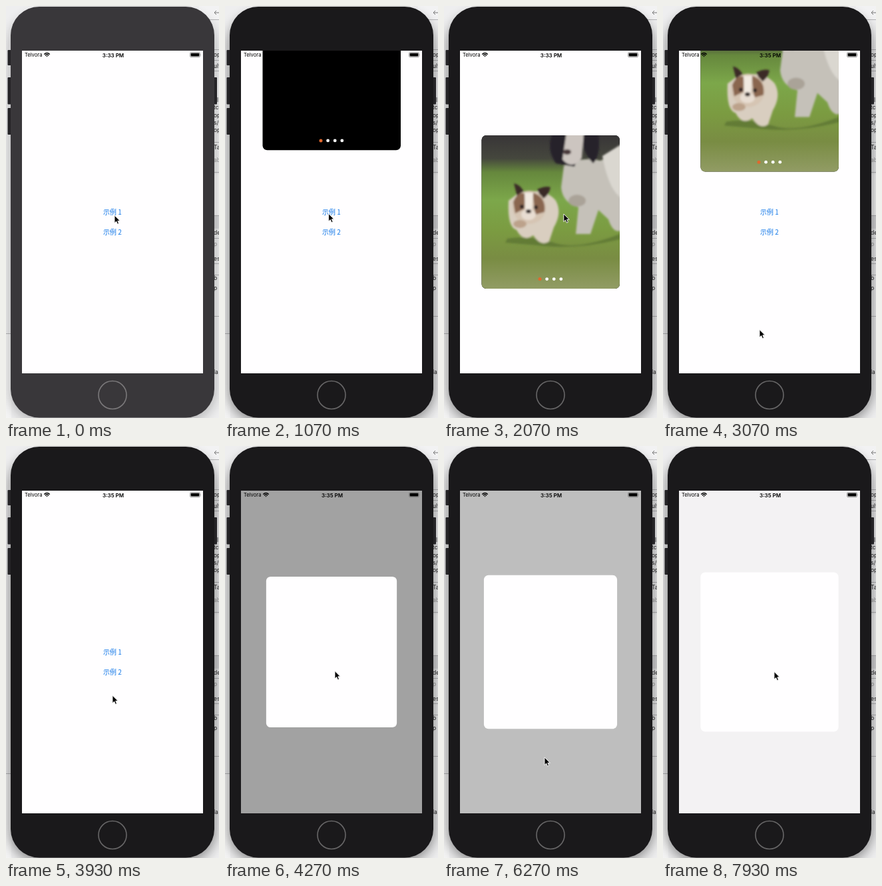
These frames come from a looping animation (320x618 px, 8 s). An HTML page:

```html
<!DOCTYPE html>
<html lang="zh">
<head>
<meta charset="utf-8">
<title>Popup demo</title>
<style>
  html, body { margin: 0; width: 100%; height: 100%; overflow: hidden; background: #e9e9ea; }
  svg { display: block; width: 320px; height: 618px; }
  .link { font: 10px "Noto Sans CJK SC", "Noto Sans CJK", sans-serif; fill: #1478e8; text-anchor: middle; }
  .bar { font: 7.6px Inter, Roboto, sans-serif; fill: #000; }
  .clock { font-weight: 600; font-size: 8px; text-anchor: middle; }
  .side { font: 8.5px Inter, sans-serif; fill: #222; }
  .faint { fill: #999; }
  #body { fill: #39373a; }
  #shade { opacity: .24; }
  .active #body { fill: #1a191b; }
  .active #shade { opacity: .42; }
  #ring { fill: none; stroke: #7b797b; stroke-width: 1.6; }
  .active #ring { stroke: #686768; }
</style>
</head>
<body>
<svg id="stage" viewBox="0 0 320 618">
  <defs>
    <clipPath id="screen"><rect x="24" y="67" width="272" height="484"/></clipPath>
    <clipPath id="photoClip"><rect x="56.5" y="194" width="207.5" height="230" rx="7"/></clipPath>
    <filter id="soft" x="-20%" y="-20%" width="140%" height="140%"><feGaussianBlur stdDeviation="1.5"/></filter>
    <filter id="wide" x="-20%" y="-20%" width="140%" height="140%"><feGaussianBlur stdDeviation="9"/></filter>
    <linearGradient id="lawn" x2="0" y2="1">
      <stop offset="0" stop-color="#383537"/>
      <stop offset=".15" stop-color="#45473d"/>
      <stop offset=".24" stop-color="#66883d"/>
      <stop offset=".42" stop-color="#7ca74a"/>
      <stop offset=".62" stop-color="#7b9b41"/>
      <stop offset=".8" stop-color="#798c43"/>
      <stop offset="1" stop-color="#929c65"/>
    </linearGradient>
  </defs>

  <!-- desktop behind the simulator -->
  <rect width="320" height="618" fill="#eeeeef"/>
  <path d="M0 491H8V618H0Z" fill="#f4f4f4"/>
  <path d="M290 0H320V20H290Z" fill="#f2f2f3"/>
  <path d="M300 20.5H320M306 65.5H320M306 81.5H320M306 97.5H320M306 204.5H320M306 249.5H320M306 314.5H320M306 348.5H320M306 386.5H320M306 403.5H320M306 465.5H320M0 491.5H8" stroke="#b5b5b7"/>
  <path d="M306 252H320V313H306Z" fill="#f8f8f8"/>
  <path d="M306 315H320V334H306Z" fill="#d9d9db"/>
  <path d="M320 10H313M316 7L313 10L316 13" fill="none" stroke="#777"/>
  <g id="notes"></g>
  <g id="shade" filter="url(#wide)"><rect x="5" y="12" width="310" height="612" rx="46"/></g>

  <!-- handset -->
  <g fill="#252427">
    <rect x="2.5" y="66" width="7" height="23" rx="1"/>
    <rect x="2.5" y="107" width="7" height="40.5" rx="1"/>
    <rect x="2.5" y="153" width="7" height="40" rx="1"/>
    <rect x="310" y="107" width="7" height="40.5" rx="1"/>
  </g>
  <rect id="body" x="7" y="1" width="306" height="616.5" rx="43"/>
  <circle id="ring" cx="160" cy="583.5" r="21"/>

  <g clip-path="url(#screen)">
    <rect x="24" y="67" width="272" height="484" fill="#fffeff"/>
    <text class="link" x="160" y="312.8">示例 1</text>
    <text class="link" id="second" x="160" y="342.6">示例 2</text>

    <g id="slides">
      <rect x="56.5" y="194" width="207.5" height="230" rx="7"/>
      <g id="photo" clip-path="url(#photoClip)">
        <rect x="56" y="194" width="209" height="231" fill="url(#lawn)"/>
        <g filter="url(#soft)">
          <path d="M95 349Q130 343 165 355T264 342V350Q205 365 150 360T92 355Z" fill="#536b2e" opacity=".6"/>
          <path d="M180 240Q205 225 235 232L270 215V335Q255 345 247 320L232 306 220 342H198L202 302Q178 295 176 272Z" fill="#c5c1b9"/>
          <path d="M238 225L270 205V290Q248 280 238 225Z" fill="#dad7d0"/>
          <path d="M163 190H232Q236 225 224 236Q212 224 208 207L196 241Q178 238 168 236Q153 215 163 190Z" fill="#252329"/>
          <path d="M184 190H210L207 228Q192 247 178 230Z" fill="#ccc5c0"/>
          <ellipse cx="185" cy="219" rx="6" ry="4" fill="#48383a"/>
          <ellipse cx="200" cy="292" rx="13" ry="9" fill="#aaa398"/>
          <path d="M97 292Q95 332 109 336Q119 355 134 344Q146 362 158 353L165 332Q178 310 168 292Q150 270 110 282Z" fill="#d9cec0"/>
          <path d="M105 266Q113 267 120 278L110 286ZM140 275Q153 269 160 272Q157 286 147 290Z" fill="#3b2928"/>
          <ellipse cx="128" cy="302" rx="25" ry="25" fill="#d6c5b3"/>
          <path d="M104 294Q111 277 122 282L121 304 107 311ZM133 280Q154 286 151 309L137 313Z" fill="#8a6650"/>
          <path d="M121 280H134L132 306H122Z" fill="#f1e9e0"/>
          <ellipse cx="127" cy="313" rx="11" ry="8" fill="#e8ddd2"/>
          <g fill="#2c2224">
            <circle cx="117" cy="301" r="3"/><circle cx="138" cy="302" r="3"/>
            <ellipse cx="127" cy="308" rx="4" ry="3"/>
          </g>
          <ellipse cx="114" cy="327" rx="10" ry="6" fill="#bca28b"/>
        </g>
      </g>
      <g fill="#fff">
        <circle cx="144" cy="409.6" r="2.5" fill="#e0682e"/>
        <circle cx="154.6" cy="409.6" r="2.4"/>
        <circle cx="165.2" cy="409.6" r="2.4"/>
        <circle cx="175.8" cy="409.6" r="2.4"/>
      </g>
    </g>

    <rect id="dim" x="24" y="67" width="272" height="484"/>
    <rect id="sheet" x="65" y="199.5" width="190" height="219" rx="6.5" fill="#fffeff"/>

    <text class="bar" x="28" y="76.4" >Telvora</text>
    <g fill="none" stroke="#000" stroke-width="1.4">
      <path d="M57.2 72.4Q61.5 68.6 65.8 72.4M58.8 74.2Q61.5 71.9 64.2 74.2"/>
      <path d="M60.2 75L61.5 76.6L62.8 75Z" fill="#000" stroke="none"/>
    </g>
    <text class="bar clock" id="clock" x="161" y="76.6"></text>
    <rect x="276.5" y="69.7" width="15" height="7" rx="1.6" fill="none" stroke="#777" stroke-width=".7"/>
    <rect x="277.6" y="70.8" width="12.8" height="4.8" rx=".8"/>
    <path d="M292.6 72V74.4Q293.8 73.2 292.6 72Z" fill="#777"/>
  </g>

  <path id="cursor" d="M0 0V11.6L2.7 9.1L4.5 13.2L6.5 12.3L4.8 8.3H8.3Z" stroke="#fff" stroke-width=".9"/>
</svg>
<script>
const $ = id => document.getElementById(id);
const LOOP = 8000, TICK = 200 / 3, TRAVEL = 363;

const notes = 'op 76|ult 93|e 115|p 130|ul 144|tc 155|op 167|s/ 178|op 189|Ta 215|ab 234|de 343|p 360|es 382|b 411|p 426|la 552';
for (const note of notes.split('|')) {
  const [word, y] = note.split(' ');
  const faint = word === 'ab' || y === '360' ? ' faint' : '';
  $('notes').innerHTML += `<text class="side${faint}" x="312" y="${y}">${word}</text>`;
}

// time, x, y of the pointer tip
const path = [
  [0, 163, 314], [70, 160, 327], [130, 157, 318], [200, 157, 313],
  [600, 157, 313], [800, 155, 312], [1000, 155, 312], [1470, 159, 308.5],
  [1800, 165, 309], [2070, 180, 312], [2400, 178, 350], [2670, 163, 424],
  [2870, 145, 485.5], [3530, 145, 485.5], [3800, 155, 410], [4070, 165, 337.5],
  [4540, 165, 337.5], [5330, 165, 440], [5670, 165, 440], [5800, 151, 467],
  [6400, 151, 467], [6930, 151, 368], [7130, 167, 338.5], [8000, 167, 338.5]
];

const smooth = (t, start, span) => {
  const u = Math.min(1, Math.max(0, (t - start) / span));
  return u * u * (3 - 2 * u);
};

function pointer(t) {
  const i = path.findIndex(p => p[0] > t);
  const [t0, x0, y0] = path[i - 1], [t1, x1, y1] = path[i];
  const u = (t - t0) / (t1 - t0);
  return [x0 + (x1 - x0) * u, y0 + (y1 - y0) * u];
}

// Damped spring running from 1 to 0
function spring(s) {
  const w = 13, z = .75, r = Math.sqrt(1 - z * z), a = w * r * s;
  return Math.exp(-z * w * s) * (Math.cos(a) + z / r * Math.sin(a));
}

function slideOffset(t) {
  if (t < 967) return -TRAVEL;
  if (t < 2920) return -TRAVEL * spring((t - 967) / 1000);
  return -TRAVEL * smooth(t, 2920, 300);
}

const OPENINGS = [4082, 7878];
function sheetLevel(t) {
  if (t >= OPENINGS[1]) return smooth(t, OPENINGS[1], 300);
  return smooth(t, OPENINGS[0], 300) - smooth(t, 6110, 300);
}

function render(t) {
  $('stage').classList.toggle('active', t > 990);
  $('clock').textContent = t < 2725 ? '3:33 PM' : '3:35 PM';

  $('slides').setAttribute('transform', `translate(0 ${slideOffset(t)})`);
  $('photo').style.display = t < 1860 ? 'none' : '';

  const level = sheetLevel(t), scale = 1.1 - .1 * level;
  $('dim').setAttribute('opacity', .545 * level);
  $('sheet').style.display = level > 0 ? '' : 'none';
  $('sheet').setAttribute('transform', `translate(160 309) scale(${scale}) translate(-160 -309)`);
  $('second').style.opacity = OPENINGS.some(o => t < o && t > o - 20) ? .3 : 1;

  $('cursor').setAttribute('transform', `translate(${pointer(t)})`);
}

const began = performance.now();
function frame() {
  const t = (performance.now() - began) % LOOP;
  render(Math.min(119, Math.floor((t + 5) / TICK)) * TICK);
  requestAnimationFrame(frame);
}
frame();
</script>
</body>
</html>
```
